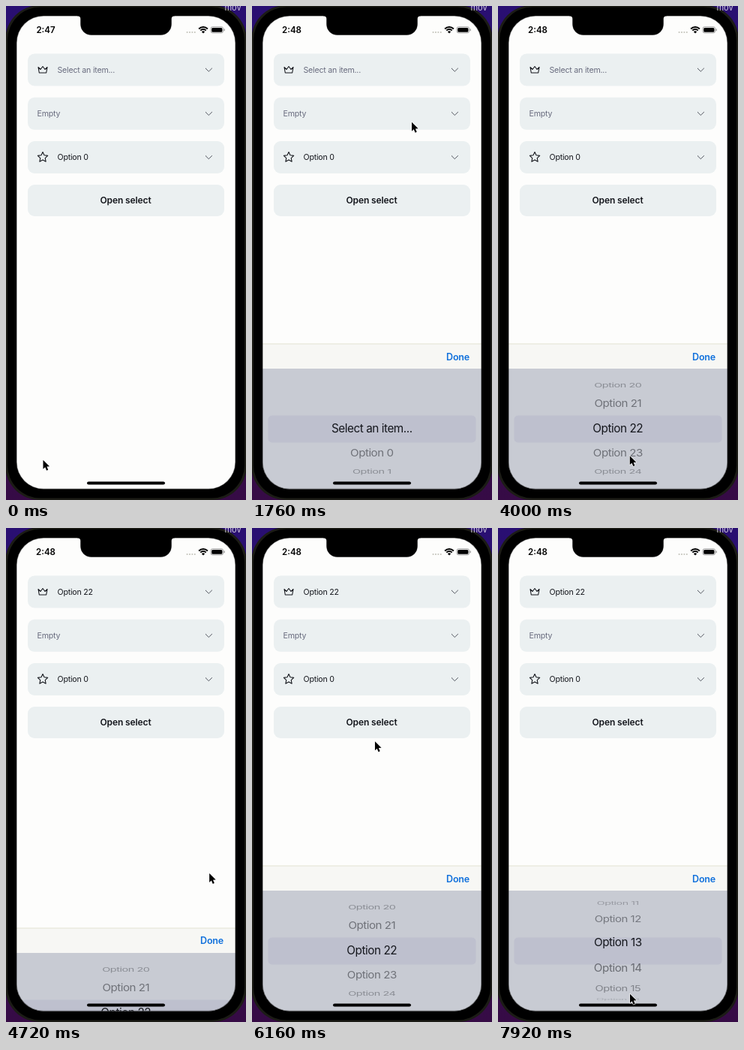
Write an HTML page with a canvas that moves like this. It is 320 px wide and 658 px high and loops after 8000 ms.

```html
<!DOCTYPE html>
<html lang="en">
<head>
<meta charset="utf-8">
<title>Select picker demo</title>
<style>
  html, body { margin: 0; width: 100%; height: 100%; overflow: hidden; background: #000; }
  canvas { display: block; width: 100%; height: 100%; }
</style>
</head>
<body>
<canvas id="stage"></canvas>
<script>
const W = 320, H = 658, LOOP = 8000, STEP = 80;
const canvas = document.getElementById('stage');
const ctx = canvas.getContext('2d');
const dpr = window.devicePixelRatio || 1;
canvas.width = W * dpr;
canvas.height = H * dpr;

const INK = '#14161c', MUTED = '#686b7e', PAPER = '#fdfdfc', FIELD = '#ebf0f1';
const FONT = 'Inter, Roboto, sans-serif';

const DRAG_PX = 79, DRAG_ROWS = 2.3, COAST_MS = 440, SHEET_MS = 400;

const clamp = k => Math.min(1, Math.max(0, k));
const progress = (t, from, to) => clamp((t - from) / (to - from));
const smooth = k => k * k * (3 - 2 * k);
const easeOut = k => 1 - (1 - k) ** 2.5;
const mix = (a, b, k) => a + (b - a) * k;

// The pointer glides from one action to the next; (x, y) is where an action ends
const rest = (start, end, x, y) => ({ start, end, x, y, dir: 0 });
const tap = (start, end, x, y) => ({ ...rest(start, end, x, y), tap: true });
const swipe = (start, end, x, y, dir, fling) => ({ start, end, x, y, dir, fling });

const actions = [
  rest(0, 80, 49.5, 604),
  tap(560, 880, 151, 89),
  rest(1680, 1760, 213, 154),
  swipe(2080, 2240, 170, 528, 1, 8.29),
  swipe(2520, 2680, 168, 528, 1, 8.29),
  swipe(2960, 3120, 166, 528, 1, 1.82),
  swipe(3520, 3920, 170, 606, -1, 0),
  tap(4480, 4640, 274, 468),
  tap(5520, 5760, 151, 89),
  swipe(6640, 7040, 181, 618, -1, 4.09),
  swipe(7520, 7920, 176, 620, -1, 0)
];
const swipes = actions.filter(a => a.dir);
const taps = actions.filter(a => a.tap);

const pointerY = (a, t) => a.y + a.dir * DRAG_PX * (1 - smooth(progress(t, a.start, a.end)));

function pointer(t) {
  const i = actions.findLastIndex(a => t >= a.start);
  const a = actions[i], b = actions[i + 1];
  if (t <= a.end || !b) return [a.x, pointerY(a, t)];
  const k = smooth(progress(t, a.end, b.start));
  return [mix(a.x, b.x, k), mix(a.y, pointerY(b, b.start), k)];
}

// Row -1 is the placeholder, row n is "Option n"
const wheelAt = t => swipes.reduce((pos, s) => pos + s.dir * (
  DRAG_ROWS * smooth(progress(t, s.start, s.end)) +
  s.fling * easeOut(progress(t, s.end, s.end + COAST_MS))), -1);

// Every tap toggles the sheet
const sheetAt = t => taps.reduce((open, a, i) =>
  open + (i % 2 ? -1 : 1) * easeOut(progress(t, a.end, a.end + SHEET_MS)), 0);

function box(x, y, w, h, r, color) {
  ctx.beginPath();
  ctx.roundRect(x, y, w, h, r);
  ctx.fillStyle = color;
  ctx.fill();
}

function label(text, x, y, size, color, { weight = 400, align = 'left', track = 0 } = {}) {
  ctx.font = `${weight} ${size}px ${FONT}`;
  ctx.letterSpacing = track + 'px';
  ctx.textAlign = align;
  ctx.textBaseline = 'alphabetic';
  ctx.fillStyle = color;
  ctx.fillText(text, x, y + size * 0.36);
}

function line(points, color, width, closed) {
  ctx.beginPath();
  points.forEach(([x, y]) => ctx.lineTo(x, y));
  if (closed) ctx.closePath();
  ctx.strokeStyle = color;
  ctx.lineWidth = width;
  ctx.lineJoin = ctx.lineCap = 'round';
  ctx.stroke();
}

function backdrop() {
  const g = ctx.createLinearGradient(0, 0, 0, H);
  g.addColorStop(0, '#290f72');
  g.addColorStop(1, '#360b45');
  ctx.fillStyle = g;
  ctx.fillRect(0, 0, W, H);
  box(-1, -1, W + 2, H + 1, 46, '#1c1c16');
  box(2, 1.5, W - 4, H - 4, 44, '#000');
  label('mov', 302.5, 2.5, 11, '#d2cbe0', { align: 'center' });
}

function crown(x, y) {
  line([[x - 6, y - 3.5], [x - 3, y - 0.5], [x, y - 4.5], [x + 3, y - 0.5],
    [x + 6, y - 3.5], [x + 4.7, y + 4], [x - 4.7, y + 4]], INK, 1.1, true);
}

function star(x, y) {
  const points = Array.from({ length: 10 }, (_, i) => {
    const a = -Math.PI / 2 + i * Math.PI / 5, r = i % 2 ? 3.4 : 7;
    return [x + r * Math.cos(a), y + r * Math.sin(a)];
  });
  line(points, INK, 1.1, true);
}

function field(y, text, color, icon) {
  box(29, y - 21.5, 262, 43, 9, FIELD);
  if (icon) icon(49, y);
  label(text, icon ? 68.5 : 41.5, y, 10.6, color, { track: -0.2 });
  line([[266, y - 2], [270.3, y + 2.2], [274.6, y - 2]], '#555862', 1);
}

function statusBar(t) {
  label(t < taps[0].end ? '2:47' : '2:48', 53, 32, 11.5, '#000', { weight: 600, align: 'center' });
  for (let i = 0; i < 4; i++) box(240.5 + i * 3.4, 34, 2.1, 2.1, 1, '#c4c4bc');
  ctx.lineCap = 'butt';
  ctx.strokeStyle = '#000';
  for (const r of [8.3, 5.2]) {
    ctx.beginPath();
    ctx.arc(263, 36.3, r, -Math.PI * 0.75, -Math.PI * 0.25);
    ctx.lineWidth = 2;
    ctx.stroke();
  }
  ctx.beginPath();
  ctx.moveTo(263, 36.5);
  ctx.arc(263, 36.5, 3, -Math.PI * 0.75, -Math.PI * 0.25);
  ctx.fillStyle = '#000';
  ctx.fill();
  ctx.beginPath();
  ctx.roundRect(273, 27.7, 16.6, 8.2, 2.5);
  ctx.strokeStyle = '#8c8c8c';
  ctx.lineWidth = 0.8;
  ctx.stroke();
  box(274.2, 28.9, 14.2, 5.8, 1.5, '#000');
  box(290.5, 30.3, 1.2, 3, 0.6, '#8c8c8c');
}

function notch() {
  ctx.beginPath();
  ctx.moveTo(95, 12);
  ctx.lineTo(95, 13);
  ctx.quadraticCurveTo(99.5, 13, 99.5, 17.5);
  ctx.lineTo(99.5, 24);
  ctx.arcTo(99.5, 38.5, 114, 38.5, 14);
  ctx.lineTo(206, 38.5);
  ctx.arcTo(220.5, 38.5, 220.5, 24, 14);
  ctx.lineTo(220.5, 17.5);
  ctx.quadraticCurveTo(220.5, 13, 225, 13);
  ctx.lineTo(225, 12);
  ctx.fillStyle = '#000';
  ctx.fill();
  ctx.strokeStyle = 'rgba(0,0,0,0.4)';
  ctx.lineWidth = 1;
  ctx.stroke();
}

function wheelRows(pos) {
  const radius = 67.2, turn = 29.4 * Math.PI / 180;
  for (let row = Math.max(-1, Math.ceil(pos - 3)); row <= pos + 3; row++) {
    const a = (row - pos) * turn, c = Math.cos(a);
    if (c < 0.05) continue;
    ctx.save();
    ctx.translate(159.8, 562.2 + radius * Math.sin(a));
    ctx.scale(0.88 + 0.12 * c, c);
    ctx.globalAlpha = mix(1, 0.55 * c ** 0.7, progress(Math.abs(a), 0.28, 0.34));
    label(row < 0 ? 'Select an item...' : 'Option ' + row, 0, 0, 15.3, INK,
      { align: 'center', track: -0.45 });
    ctx.restore();
  }
}

function picker(open, pos) {
  if (open <= 0) return;
  ctx.save();
  ctx.translate(0, (1 - open) * 194);
  box(14, 450, 292, 34, 0, '#f7f7f4');
  box(14, 449.5, 292, 1, 0, '#e4e4d4');
  label('Done', 290, 467, 12.5, '#1070dc', { weight: 600, align: 'right', track: -0.2 });
  box(14, 483, 292, 162, 0, '#c8cbd3');
  box(21.5, 545.5, 277, 36, 5, '#bec0ce');
  wheelRows(pos);
  ctx.restore();
}

function touch(x, y) {
  ctx.beginPath();
  ctx.arc(x, y, 15.3, 0, Math.PI * 2);
  ctx.fillStyle = 'rgba(115,115,122,0.38)';
  ctx.fill();
  ctx.strokeStyle = 'rgba(90,90,96,0.65)';
  ctx.lineWidth = 0.9;
  ctx.stroke();
}

function arrow(x, y) {
  ctx.save();
  ctx.translate(x, y + 0.8);
  ctx.scale(0.84, 0.84);
  ctx.beginPath();
  [[0, 0], [0, 14.2], [3.2, 11.3], [5.5, 16.6], [8, 15.5], [5.8, 10.4], [10.2, 10.2]]
    .forEach(([px, py]) => ctx.lineTo(px, py));
  ctx.closePath();
  ctx.lineJoin = 'round';
  ctx.lineWidth = 1.6;
  ctx.strokeStyle = 'rgba(255,255,255,0.85)';
  ctx.stroke();
  ctx.fillStyle = '#000';
  ctx.fill();
  ctx.restore();
}

function draw(t) {
  ctx.setTransform(canvas.width / W, 0, 0, canvas.height / H, 0, 0);
  backdrop();

  ctx.save();
  ctx.beginPath();
  ctx.roundRect(14, 13, 292, 630.5, 36);
  ctx.clip();
  box(14, 13, 292, 631, 0, PAPER);
  const chosen = t >= taps[1].end;
  field(85, chosen ? 'Option 22' : 'Select an item...', chosen ? INK : MUTED, crown);
  field(143.3, 'Empty', MUTED);
  field(201.5, 'Option 0', INK, star);
  box(29, 238, 262, 42, 9, FIELD);
  label('Open select', 159.5, 258.7, 12, INK, { weight: 600, align: 'center', track: -0.1 });
  statusBar(t);
  picker(sheetAt(t), wheelAt(t));
  box(108, 633.4, 104, 4.2, 2.1, '#000');
  ctx.restore();

  // Soft inner edge of the screen
  ctx.beginPath();
  ctx.roundRect(14, 13, 292, 630.5, 36);
  ctx.strokeStyle = 'rgba(0,0,0,0.45)';
  ctx.lineWidth = 1.4;
  ctx.stroke();
  notch();

  const [x, y] = pointer(t);
  if (taps.some(a => t >= a.end - 160 && t < a.end)) touch(x, y);
  arrow(x, y);
}

function tick() {
  const t = performance.now() % LOOP;
  draw(Math.floor(t / STEP) * STEP);
  requestAnimationFrame(tick);
}
tick();
</script>
</body>
</html>
```
